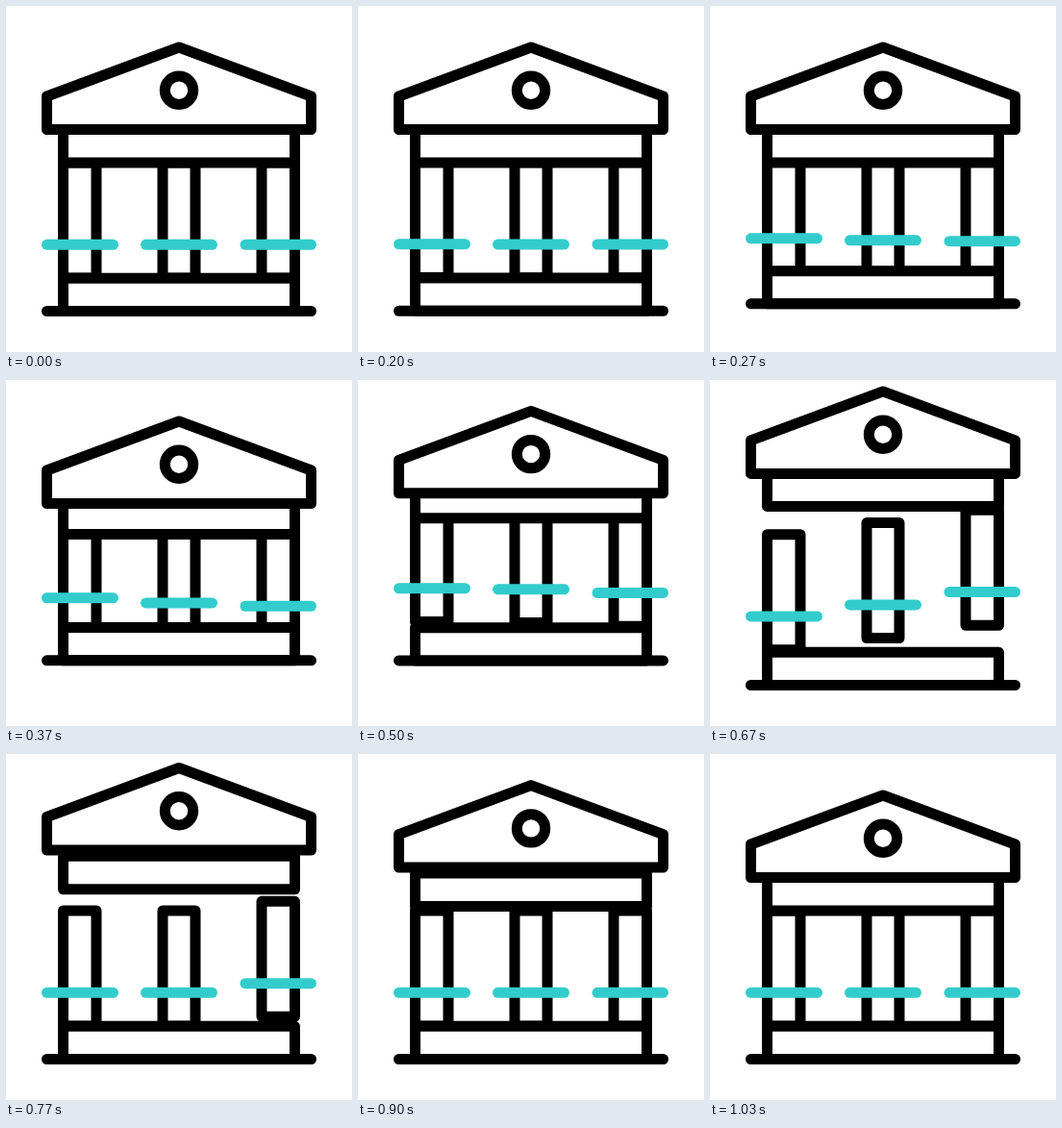
Animation, 360 px wide and 360 px high, one loop 1670 ms. Source, as an HTML page:

```html
<!DOCTYPE html>
<html lang="en">
<head>
<meta charset="utf-8">
<title>Bank icon</title>
<style>
  html, body { margin: 0; width: 100%; height: 100%; overflow: hidden; background: #fff; }
  svg { display: block; width: 100vw; height: 100vh; fill: #fff; stroke: #000; stroke-width: 11; stroke-linecap: round; stroke-linejoin: round; }
  .band { stroke: #3cc; }
</style>
</head>
<body>
<svg viewBox="0 0 360 360">
  <g id="left"><path d="M59.5 163H94V283H59.5Z"/><path class="band" d="M42.5 248.3H111.5"/></g>
  <g id="middle"><path d="M163 163H197V283H163Z"/><path class="band" d="M145.5 248.3H214.5"/></g>
  <g id="right"><path d="M266 163H300.5V283H266Z"/><path class="band" d="M249 248.3H317.5"/></g>
  <g id="base"><path d="M59.5 283.3H300.5V317.5H59.5Z"/><path d="M42.5 317.5H317.5"/></g>
  <g id="beam"><path d="M59.5 128.5H300.5V163H59.5Z"/></g>
  <g id="roof"><path d="M42.5 94L180 43L317.5 94V128.5H42.5Z"/><circle cx="180" cy="87.8" r="14.7"/></g>
</svg>
<script>
  const LOOP = 1670, LIFT = 32, FPS = 30;
  // Start, peak and end of each part's rise and fall, in frames at 30 fps
  const parts = {
    base: [5.6, 13.15, 19.6],
    left: [5.35, 14.5, 21.1],
    middle: [5.4, 16.45, 23.1],
    right: [5.3, 18.3, 25.7],
    beam: [9.3, 19.3, 29.4],
    roof: [11.2, 21, 30.7]
  };

  function ease(u) {
    u = Math.min(1, Math.max(0, u));
    return u * u * (3 - 2 * u);
  }

  function draw(now) {
    const step = Math.floor((now % LOOP + 3.4) * FPS / 1000);
    for (const [id, [start, peak, end]] of Object.entries(parts)) {
      const u = step < peak ? (step - start) / (peak - start) : (end - step) / (end - peak);
      document.getElementById(id).setAttribute("transform", `translate(0 ${-LIFT * ease(u)})`);
    }
    requestAnimationFrame(draw);
  }
  draw(0);
</script>
</body>
</html>
```
